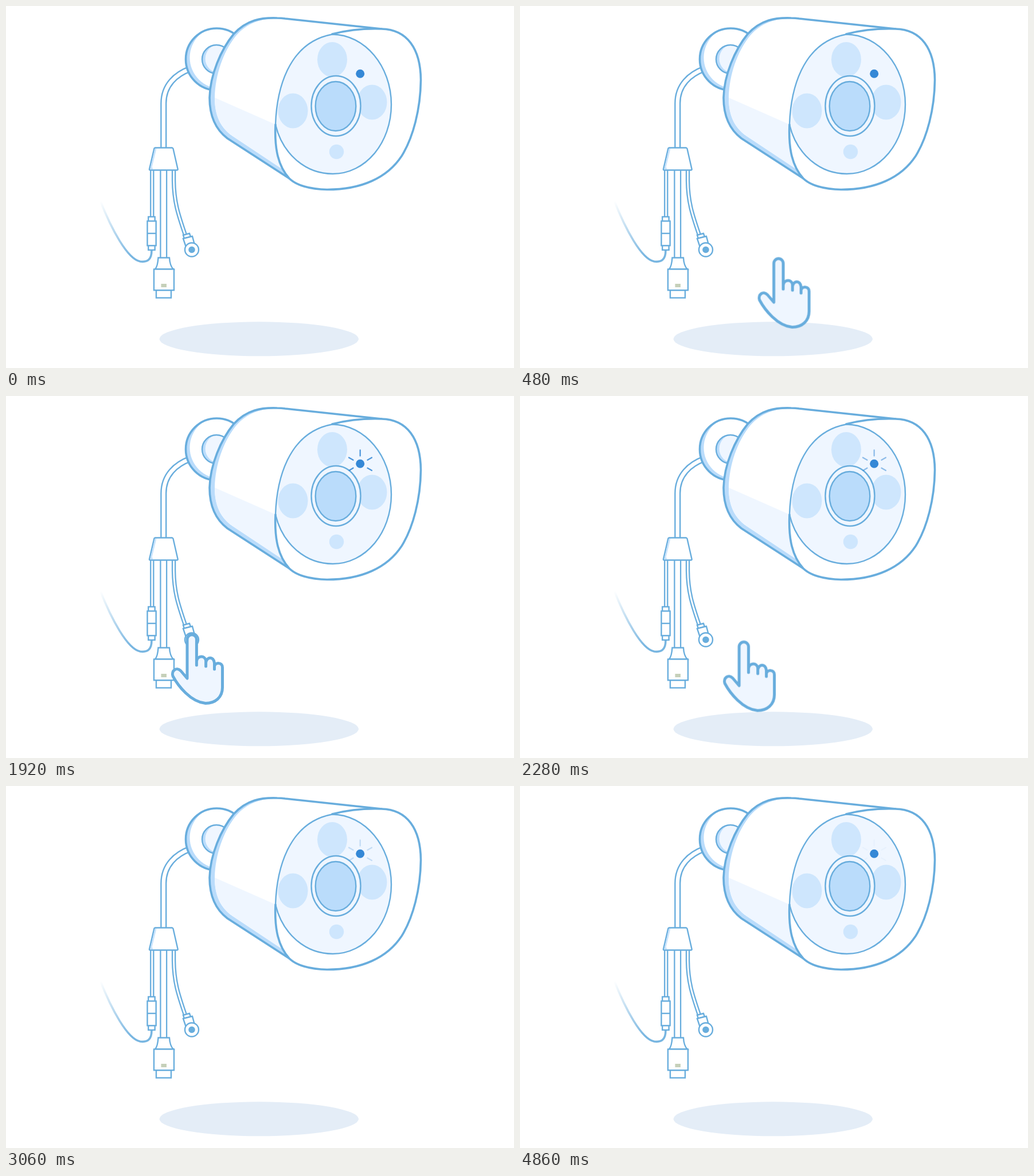
An HTML page that plays this animation: 886 px wide and 632 px high, repeating every 4.9 s.

```html
<!DOCTYPE html>
<html lang="en">
<head>
<meta charset="utf-8">
<title>Camera reset</title>
<style>
  :root {
    --line: #68addd;
    --pale: #eff6ff;
    --soft: #cee6fd;
    --mid: #badcfb;
    --dot: #3588d6;
    --loop: 4900ms;
  }
  html, body { margin: 0; width: 100%; height: 100%; overflow: hidden; background: #fff; }
  svg { display: block; width: 100%; height: 100%; }

  .thin { stroke: var(--line); stroke-width: 2.4; fill: #fff; }
  .bold { stroke: var(--line); stroke-width: 3.6; fill: none; stroke-linecap: round; stroke-linejoin: round; }
  .wire { stroke: var(--line); fill: none; }
  .core { stroke: #fff; fill: none; }
  .pale { fill: var(--pale); }
  .soft { fill: var(--soft); }
  .mid { fill: var(--mid); }
  .white { fill: #fff; }

  .rays { stroke: var(--dot); stroke-width: 2.3; stroke-linecap: round; animation: blink var(--loop) linear infinite; }
  .ripple { fill: #f55; transform-origin: 324px 425.5px; animation: press var(--loop) linear infinite; }
  .move { animation: move var(--loop) linear infinite; }
  .hand {
    fill: var(--pale); stroke: var(--line); stroke-width: 5;
    stroke-linejoin: round; stroke-linecap: round;
    animation: show var(--loop) linear infinite;
  }

  @keyframes blink {
    0%, 36.32% { opacity: 0; }
    36.326% { opacity: 1; }
    57.551% { opacity: 0; }
    78.776% { opacity: 1; }
    100% { opacity: 0; }
  }
  @keyframes press {
    0%, 15.92% { opacity: 0; transform: scale(.5); }
    17.95%, 36.3% { opacity: 1; transform: none; }
    38.2%, 100% { opacity: 0; transform: scale(.5); }
  }
  @keyframes move {
    0%, 2.041% { transform: translate(267px, 51px); animation-timing-function: ease-in-out; }
    17.143%, 41.347% { transform: none; animation-timing-function: ease-in-out; }
    56.449%, 100% { transform: translate(267px, 51px); }
  }
  @keyframes show {
    0%, 2.041% { opacity: 0; }
    4.08%, 54.3% { opacity: 1; }
    56.449%, 100% { opacity: 0; }
  }
</style>
</head>
<body>
<svg viewBox="0 0 886 632">
  <defs>
    <linearGradient id="fade" gradientUnits="userSpaceOnUse" x1="166" y1="340" x2="222" y2="436">
      <stop offset="0" stop-color="#68addd" stop-opacity="0"/>
      <stop offset="1" stop-color="#68addd" stop-opacity=".9"/>
    </linearGradient>
    <clipPath id="disc"><circle cx="367.5" cy="93" r="54"/></clipPath>
    <clipPath id="hub"><circle cx="367" cy="93" r="25"/></clipPath>
  </defs>

  <ellipse cx="441.3" cy="581.3" rx="173.7" ry="30" fill="#e4edf7"/>

  <!-- main cable and mount -->
  <path class="wire" stroke-width="11.2" d="M322 109.500C296 119 274.800 138 274.800 170V247"/>
  <path class="core" stroke-width="6.4" d="M322 109.500C296 119 274.800 138 274.800 170V247"/>
  <g clip-path="url(#disc)">
    <rect class="mid" x="310" y="36" width="120" height="115"/>
    <circle class="white" cx="375" cy="90" r="54.500"/>
  </g>
  <circle class="bold" cx="367.5" cy="93" r="54"/>
  <g clip-path="url(#hub)">
    <rect class="mid" x="340" y="66" width="55" height="55"/>
    <circle class="pale" cx="372.500" cy="92" r="25"/>
  </g>
  <circle class="thin" style="fill:none" cx="367" cy="93" r="25"/>

  <!-- body -->
  <path class="mid" d="M494 301L386 231C365 215 355 190 355 160C356 120 375 76 397 49C420 24 445 20 473 21L487 22 655 40V200Z"/>
  <path class="white" d="M484 286L395 227C372 211 364 188 364 160C365 118 380 80 398 56C415 33 440 22 473 21L487 22 655 40V200Z"/>
  <path class="pale" d="M364 160L475 209 488 289 395 227C372 211 364 188 364 160Z"/>
  <path class="bold" d="M494 301L386 231C365 215 355 190 355 160C356 120 375 76 397 49C420 24 445 20 473 21Q480 21 487 22L655 40"/>

  <!-- front -->
  <path class="white" d="M569 49C600 41 625 39 655 40C700 41 723 75 723.500 129C723 180 710 230 690 262C665 300 620 320.500 560 320.500C530 320 506 313 494 301C475 280 468 250 470 207C472 150 490 64 569 49Z"/>
  <path class="pale" d="M569 49.500C626 50 672 105 672 172C672 239 627 293 570 293C522 293 482 258 470 207C472 150 490 64 569 49.500Z"/>
  <path class="thin" style="fill:none" d="M569 49.500C626 50 672 105 672 172C672 239 627 293 570 293C522 293 482 258 470 207C472 150 490 64 569 49.500"/>
  <path class="bold" d="M569 49C600 41 625 39 655 40C700 41 723 75 723.500 129C723 180 710 230 690 262C665 300 620 320.500 560 320.500C530 320 506 313 494 301C475 280 468 250 470 207"/>
  <g class="soft">
    <ellipse cx="569" cy="93.500" rx="26" ry="30.500"/>
    <ellipse cx="500.500" cy="183" rx="26" ry="30.500"/>
    <ellipse cx="638.500" cy="168" rx="26" ry="30.500"/>
    <circle cx="576.500" cy="254.500" r="12.700"/>
  </g>
  <ellipse class="thin" style="fill:#eff6ff" cx="575.500" cy="174.500" rx="43" ry="52.500"/>
  <ellipse class="thin" style="fill:#badcfb" cx="575" cy="175" rx="35.300" ry="43"/>
  <circle cx="617.700" cy="118.200" r="7.500" fill="#3588d6"/>
  <path class="rays" d="M617.700 94.500V104.500M638 107.500L630.500 111.800M598 107.500L605.500 111.800M638 130L630.500 125.700M598.500 130L605.500 125.700"/>

  <!-- cable tails -->
  <path class="wire" stroke-width="7.400" d="M254.800 286V369M292.600 286V305C293 345 302 368 313 401"/>
  <path class="core" stroke-width="2.800" d="M254.800 286V369M292.600 286V305C293 345 302 368 313 401"/>
  <path class="wire" stroke-width="13" d="M274.800 286V440"/>
  <path class="core" stroke-width="8.400" d="M274.800 286V440"/>
  <path class="thin" stroke-linejoin="round" d="M260 247.500H290L291.500 249 299.700 285Q299.700 286.500 298 286.500H251.500Q250 286.500 250 285L258.500 248.500Z"/>
  <path class="mid" d="M259.300 249H262.500L255 280Q254.500 283 257 285.200H251.500Z" opacity=".8"/>

  <path class="wire" style="stroke:url(#fade)" stroke-width="3.600" d="M164 339C184 390 212 442 234 446C248 448 254 441 254 427"/>
  <g class="thin">
    <rect x="248.300" y="368" width="11.400" height="8"/>
    <rect x="248.300" y="418" width="11.400" height="8"/>
    <rect x="246.500" y="375.500" width="15.200" height="42.800"/>
    <path d="M246.500 397H261.700"/>
    <path d="M265.500 439.500H285C285.500 448 287 455 292 459.500H260C264 455 265 448 265.500 439.500Z"/>
    <rect x="262" y="496" width="26" height="13.500"/>
    <rect x="258" y="459.500" width="35" height="36.700"/>
    <path d="M309 400L320 397 322 403 311 406Z"/>
    <path d="M309 406L325 402 329 417 314 421Z"/>
    <circle cx="324" cy="425.500" r="12"/>
  </g>
  <rect x="270.500" y="485" width="9.500" height="6" fill="#c6d0b9"/>
  <circle cx="324" cy="425.500" r="5.800" fill="#68addd"/>

  <!-- press -->
  <g class="ripple">
    <circle cx="324" cy="425.500" r="29.500" opacity=".28"/>
    <circle cx="324" cy="425.500" r="16" opacity=".38"/>
  </g>
  <g class="move">
    <path class="hand" d="M316 493V425a8.200 8.200 0 0 1 16.400 0V470V463C334 452.500 347 452.500 348.600 462V472V466C350 454.500 362 454 363.500 466V477V472C365 464.500 377.500 464.500 377.500 474V509C377.500 526 365 536.500 348 536.500C322 534 300 506 291 489C288 480 297 472 305 480Z"/>
  </g>
</svg>
</body>
</html>
```
